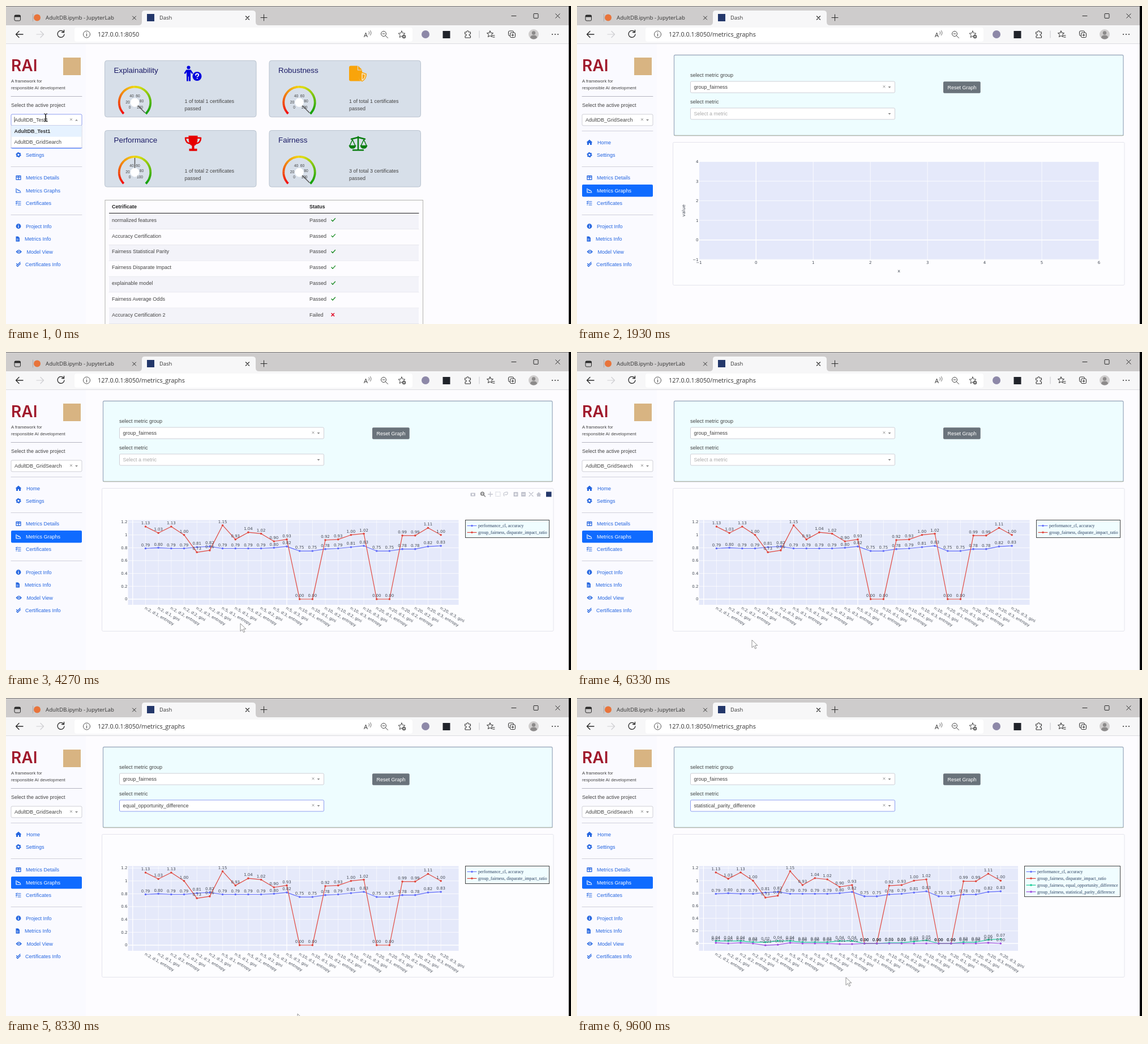
Animation of 998x561 px, one loop 9.63 s. Source, as an HTML page:

```html
<!DOCTYPE html>
<html lang="en">
<head>
<meta charset="utf-8">
<title>Dashboard demo</title>
<style>
html, body { margin: 0; width: 100%; height: 100%; overflow: hidden; background: #fdfcff; }
svg { display: block; width: 100%; height: 100%; }
text { font: 9px "Liberation Sans", Arial, sans-serif; fill: #444; white-space: pre; }
.brand { font: 600 28px Inter, sans-serif; fill: #a01a2c; }
.ui { font-family: "Open Sans", "Noto Sans", sans-serif; fill: #333; }
.plot { font: 7px "DejaVu Sans", sans-serif; fill: #444a55; }
.legend { font: 7.8px "Liberation Serif", serif; fill: #2a3f5f; }
.line { fill: none; stroke: currentColor; stroke-linecap: round; stroke-linejoin: round; }
.solid { fill: currentColor; }
</style>
</head>
<body>
<svg viewBox="0 0 998 561">
  <g id="chrome"></g>
  <g id="page"></g>
  <g id="side"></g>
  <g id="arrow"><path d="M0 0v13.5l3.3-3 2.3 5 2.2-1-2.3-4.8h4.4z" fill="#fff" stroke="#777" stroke-width=".8"/></g>
  <g id="beam"><path d="M-3-7q3 0 3 2v10q0 2-3 2M3-7q-3 0-3 2v10q0 2 3 2" fill="none" stroke="#111"/></g>
  <rect x="994" width="4" height="561"/>
</svg>
<script>
const LOOP = 9630;
const $ = id => document.getElementById(id);

// y is the vertical middle of the text
const text = (x, y, s, { size = 9, cls = '', fill, bold, anchor = 'start' } = {}) =>
  `<text x="${x}" y="${y + size * .35}" class="${cls}" text-anchor="${anchor}" style="font-size:${size}px` +
  `${fill ? `;fill:${fill}` : ''}${bold ? ';font-weight:700' : ''}">${s}</text>`;
const rect = (x, y, w, h, fill, stroke = 'none', r = 0, sw = 1) =>
  `<rect x="${x}" y="${y}" width="${w}" height="${h}" rx="${r}" fill="${fill}" stroke="${stroke}" stroke-width="${sw}"/>`;
const circle = (x, y, r, fill, extra = '') => `<circle cx="${x}" cy="${y}" r="${r}" fill="${fill}" ${extra}/>`;
const tint = color => color ? `color="${color}"` : '';
const line = (d, color, w = 1) => `<path d="${d}" class="line" ${tint(color)} stroke-width="${w}"/>`;
const solid = (d, color) => `<path d="${d}" class="solid" ${tint(color)}/>`;
const at = (x, y, body) => `<g transform="translate(${x} ${y})">${body}</g>`;
const cross = (x, y, r, color, w = 1) => line(`M${x - r} ${y - r}l${2 * r} ${2 * r}m0 ${-2 * r}l${-2 * r} ${2 * r}`, color, w);

function chrome({ title, page }) {
  const ink = '#2b2b2b';
  const url = '127.0.0.1:8050' + (page === 'graphs' ? '/metrics_graphs' : '');
  return rect(0, 0, 998, 35, '#cecccc') + rect(0, 0, 998, 1, '#7a7878') + rect(0, 34, 998, 33, '#f7f7f8') +
    solid('M234 34q6 0 6-6V13q0-5 5-5h190q6 0 6 5v15q0 6 6 6z', '#f7f7f8') +
    line('M0 66.5H994', '#dcdce0') + line('M47.5 14v13', '#aaa8a8') + rect(121, 38, 597, 25, '#fff', 'none', 4) +
    rect(15, 16, 10.5, 10, 'none', ink, 2) + rect(15, 16, 10.5, 3.5, ink, 'none', 1) +
    circle(55, 20.5, 6, '#e8743b') + text(70, 20.5, 'AdultDB.ipynb - JupyterLab', { size: 9.7, cls: 'ui' }) +
    cross(226.5, 21, 3, ink) + rect(249, 14, 13, 13, '#24386b') +
    text(271, 20.5, title, { size: 9.4, cls: 'ui' }) + cross(426.5, 21, 3, ink, 1.2) +
    line('M450 20.5h11m-5.5-5.5v11M893 17.5h8', ink) + rect(932, 13.5, 8, 8, 'none', ink, 1) + cross(974.5, 17.5, 3.7, ink) +
    line('M30 50H17.5l5.5-5.5M17.5 50l5.5 5.5', ink, 1.3) + line('M54 50h12.5l-5.5-5.5M66.5 50l-5.5 5.5', '#cfcfd2', 1.2) +
    line('M102 46a6 6 0 1 0 1 4M102.5 42.5v4h-4', ink, 1.3) +
    circle(142.5, 50, 6, 'none', 'stroke="#555"') + line('M142.5 49v4M142.5 46.5v.2', '#555', 1.2) +
    text(162, 50, url, { size: 10.8, cls: 'ui' }) +
    text(632, 51, 'A', { size: 11, cls: 'ui' }) + line('M641 45q2 2 0 5M643.5 43.5q3 4 0 8', '#555', .9) +
    circle(667, 49, 4.5, 'none', 'stroke="#444"') + line('M670.5 52.5l4 4M665 49h4', '#444') +
    line('M699 44l1.7 3.8 4.3.4-3.2 3 1 4.2-3.8-2.2-3.8 2.2 1-4.2-3.2-3 4.3-.4z', '#444') +
    circle(703, 54, 3.2, '#555') + line('M701.5 54h3m-1.5-1.5v3', '#fff', .8) +
    circle(741, 50, 7, '#8d88a8') + rect(771.5, 44, 13, 13, '#20232a') +
    line('M811 46h3q-.5-2.5 1.5-2.5t1.5 2.5h3.5v3.5q-2.5-.5-2.5 1.5t2.5 1.5v3.5h-9.5v-3.5q2.5.5 2.5-1.5t-2.5-1.5z', ink) +
    line('M836 44v12', '#c8c8cc') +
    line('M855 44l1.5 3.5 4 .3-3 2.7 1 4-3.5-2-3.5 2 1-4-3-2.7 4-.3zM859 52h4m-3 3h3', ink) +
    rect(887.5, 44, 9, 8.5, 'none', ink, 2) + rect(890.5, 47, 9, 8.5, '#f7f7f8', ink, 2) + line('M893 51.3h4m-2-2v4', ink) +
    circle(932, 50, 9, '#cfcdcd') + circle(932, 47.5, 3.2, '#8c8a8a') + solid('M926 56q0-4.5 6-4.5t6 4.5q-6 5-12 0z', '#8c8a8a') +
    [965, 970, 975].map(x => circle(x, 50, 1, ink)).join('');
}

const FOCUS = '#8e9df0';
function select(x, y, w, value, { focus, open, hint } = {}) {
  const mid = y + 10, end = x + w;
  const arrow = open ? `M${end - 12} ${mid + 1.5}h5l-2.5-2.5z` : `M${end - 12} ${mid - 1}h5l-2.5 2.7z`;
  return rect(x, y, w, 20, '#fff', focus ? FOCUS : '#cfcfd6', 2) +
    text(x + 6, mid, value || hint, { fill: value ? '#444' : '#aaa' }) +
    (value ? cross(end - 19, mid - .8, 1.6, '#888', .9) : '') + solid(arrow, '#888') +
    (open ? line(`M${x + 6} ${mid - 5}v9`, '#333', .8) : '');
}

const OPTION = 19.7;
function menu(x, y, w, options, hover, current) {
  const bottom = y + options.length * OPTION;
  return rect(x, y, w, bottom - y, '#fff', '#cfd3e0') +
    options.map((o, i) => (i === hover ? rect(x + .5, y + i * OPTION, w - 1, OPTION, '#e6f2ff') : '') +
      text(x + 5.5, y + (i + .5) * OPTION - .5, o, o === current ? { bold: true, fill: '#333' } : {})).join('') +
    line(`M${x} ${bottom}h${w}`, FOCUS, 1.2);
}

// label, middle, text start, icon
const NAV = [
  ['Home', 240.5, 36, solid('M-5.5 0L0-4.8 5.5 0H4v4.5H1V1.5H-1v3H-4V0z')],
  ['Settings', 262.5, 35, circle(0, 0, 2.7, 'none', 'stroke="currentColor" stroke-width="2"') +
    circle(0, 0, 3.9, 'none', 'stroke="currentColor" stroke-width="1.5" stroke-dasharray="2 2.08"')],
  ['Metrics Details', 303, 35, line('M-4-3.3h8v6.6h-8zM-4-.5h8M0-3v6M-4-2.8h8', '', 1.2)],
  ['Metrics Graphs', 325.5, 35, line('M-4-3.5v7h8M-2-2l2 2 1.5-.5 2 2.5', '', 1.2)],
  ['Certificates', 348, 35, line('M-1-3h5M-1 0h5M-1 3h5M-4.5-3l1 1 1.3-2M-4.5 0l1 1 1.3-2M-4 3h.5', '', 1.1)],
  ['Project Info', 388.5, 35, circle(0, 0, 4.4, 'currentColor') + line('M0-.3v2.5M0-2.3v.1', '#fff', 1.3)],
  ['Metrics Info', 411, 33, solid('M-4.5-4.5h4l2.500 2.500v6.500h-6.500z') + line('M-3 0h3M-3 2h3', '#fff', .7)],
  ['Model View', 433.5, 36.5, solid('M-4.500 0Q.7-7 5.900 0Q.7 7-4.500 0z') + circle(.7, 0, 2.2, '#fff') + circle(.7, 0, 1.2, 'currentColor')],
  ['Certificates Info', 455.5, 34, line('M-3.5-1l2 2 4.5-4.5M-3.5 2l2 2 5-5', '', 1.2)]
];
const PROJECTS = ['AdultDB_Test1', 'AdultDB_GridSearch'];

function sidebar({ project, page, open, focus, hover }) {
  const active = page === 'home' ? 'Home' : 'Metrics Graphs';
  const nav = NAV.map(([label, y, x, icon]) => {
    const on = label === active, fill = on ? '#fff' : '#2566e0';
    return (on ? rect(9, y - 10.5, 125, 21.5, '#0f6bff', 'none', 2) : '') +
      `<g color="${fill}">${at(22, y, icon)}</g>` + text(x, y, label, { fill });
  }).join('');
  return rect(0, 67, 141, 494, '#fafaff') + '<text x="9" y="114.5" class="brand">RAI</text>' +
    rect(101, 91, 31, 31, '#d8b482') +
    text(9, 132.5, 'A framework for', { size: 7.8 }) + text(9, 144.5, 'responsible AI development', { size: 7.8 }) +
    [159.5, 220.5, 283.5, 368.5].map((y, i) => line(`M9 ${y}h125`, i ? '#d0d0da' : '#b4b4c0')).join('') +
    text(9, 175, 'Select the active project') +
    select(9, 191, 125, project, { focus: focus === 'project', open: open === 'project' }) + nav +
    (open === 'project' ? menu(9, 211, 125, PROJECTS, hover, project) : '');
}

function gauge(x, y, value) {
  const point = (p, r) => {
    const a = (135 + 270 * p) * Math.PI / 180;
    return `${(x + r * Math.cos(a)).toFixed(2)} ${(y + r * Math.sin(a)).toFixed(2)}`;
  };
  let arc = '';
  for (let i = 0; i < 40; i++) {
    const p = i / 40, hue = p < .5 ? p * 110 : 55 + (p - .5) * 130, light = p < .5 ? 50 : 62 - p * 30;
    arc += `<path d="M${point(p, 27.7)}A27.7 27.7 0 0 1 ${point(p + .027, 27.7)}" fill="none" stroke="hsl(${hue} 90% ${light}%)" stroke-width="3.8"/>`;
  }
  const marks = [[-9, 8], [-12.5, -.5], [-5.5, -11.5], [5.5, -11.5], [12, -2.5], [9, 8]]
    .map(([dx, dy], i) => text(x + dx, y + dy, i * 20, { size: 6.7, anchor: 'middle' })).join('');
  return arc + line(`M${x} ${y}L${point(value, 25)}`, '#555', 1.5) + marks + circle(x, y, 7.8, '#fff');
}

const CARDS = [
  ['Explainability', 1, 1, 1, circle(7, 3, 3, '#00d') +
    solid('M3 7h8l4 6-1.8 1.5-2.7-3.5v16h-3v-8h-1v8h-3v-16l-2.5 3.5L-1 13z', '#00d') + circle(22, 18.5, 8, '#00d') +
    line('M19.5 16.5q.5-2.5 2.7-2.5t2.5 2-2.5 3M22.2 22v.2', '#fff', 1.8)],
  ['Robustness', 1, 1, 1, solid('M0 3q0-3 3-3h12v8h8v4l-7 3q0 9 5 12H3q-3 0-3-3zM16 0l7 7h-7z', '#f9a40b') +
    solid('M23 11l8 3q0 10-8 14-8-4-8-14z', '#f9a40b') + line('M23 13.5l5.5 2q0 7-5.5 10z', '#f5e6c8', 1.5)],
  ['Performance', 1, 2, .5, solid('M7 0h16v4q0 12-6 14v5h5v4H8v-4h5v-5q-6-2-6-14z', '#e60000') +
    line('M7 4H1.5q0 9 9 10M23 4h5.5q0 9-9 10', '#e60000', 2.5)],
  ['Fairness', 3, 3, 1, line('M16 2v23M7 25.5h18M4 6l12-3 12 3', '#0a7d10', 2.5) +
    line('M1 18l5-11 5 11M21 18l5-11 5 11', '#0a7d10', 1.5) +
    solid('M-.5 17h13q-1 6-6.5 6t-6.5-6zM19.5 17h13q-1 6-6.5 6t-6.5-6z', '#0a7d10')]
];
const ROWS = ['normalized features', 'Accuracy Certification', 'Fairness Statistical Parity', 'Fairness Disparate Impact',
  'explainable model', 'Fairness Average Odds', 'Accuracy Certification 2'];

function home() {
  const cards = CARDS.map(([name, passed, total, value, icon], i) => {
    const x = 174.5 + i % 2 * 290.5, y = 96.3 + (i >> 1) * 123.3;
    return rect(x, y, 267.5, 99.5, '#d7dfe9', '#b9c3cf', 4) +
      text(x + 16, y + 17.2, name, { size: 13.4, fill: '#1b1b66' }) +
      at(x + 141, y + 9.2, icon) + gauge(x + 53, y + 74, value) +
      text(x + 141, y + 71.2, `${passed} of total ${total} certificates`) + text(x + 141, y + 84.7, 'passed');
  }).join('');
  const rows = ROWS.map((name, i) => {
    const y = 366 + i * 27.85, mid = y + 11.5, ok = i < 6;
    return rect(182, y, 547, 27.85, i % 2 ? '#fdfcff' : '#f3f3f9') + line(`M182 ${y + 27.8}h547`, '#dedee6') +
      text(187, mid, name) + text(536, mid, ok ? 'Passed' : 'Failed') +
      (ok ? line(`M575 ${mid}l2 2.3 4.5-5`, '#188a22', 1.3) : cross(577.3, mid, 2.3, '#e0102a', 1.5));
  }).join('');
  const head = { bold: true, fill: '#222' };
  return cards + rect(175, 342.5, 561.5, 240, '#fdfcff', '#b2b2ae') + rows + line('M182.5 365.5H729', '#222', 1.2) +
    text(187, 353.5, 'Cetrificate', head) + text(536, 353.5, 'Status', head);
}

// values in hundredths
const SERIES = [
  ['performance_cl, accuracy', '#636efa', '79 80 79 79 81 82 79 79 79 79 80 82 75 75 78 79 81 83 75 75 78 78 82 83'],
  ['group_fairness, disparate_impact_ratio', '#e0483f', '113 103 113 100 73 76 115 93 104 102 90 93 0 0 92 93 100 102 0 0 99 99 111 100'],
  ['group_fairness, equal_opportunity_difference', '#1fce9b', '4 4 4 2 2 4 4 2 2 2 4 4 0 0 1 1 3 5 0 0 2 2 6 7'],
  ['group_fairness, statistical_parity_difference', '#a04fe0', '1 0 1 0 -3 -2 1 0 0 0 -1 -1 0 0 0 0 0 0 0 0 0 0 1 0']
].map(([name, color, v]) => ({ name, color, values: v.split(' ').map(n => n / 100) }));
const LABELS = [2, 5, 10, 20].flatMap(n => [1, 2, 3].flatMap(d => ['entropy', 'gini'].map(c => `n:${n}, d:${d}, ${c}`)));
const PLOT_BG = '#e5e9fa';
const TICKS = [0, .2, .4, .6, .8, 1, 1.2];
const LAYOUTS = [null,
  { right: 922, x0: 252, dx: 27.7, y0: 1552, unit: 1500, ticks: [.76, .78, .8, .82] },
  { right: 799.5, x0: 246.5, dx: 22.68, y0: 436, unit: 113.3, ticks: TICKS, legend: 811 },
  { right: 779, x0: 245.3, dx: 21.87, y0: 433, unit: 110.8, ticks: TICKS, legend: 790 }];

const plotText = (x, y, s, anchor, size = 7) => text(x, y, String(s).replace('-', '−'), { size, anchor, cls: 'plot' });

function emptyChart() {
  let out = rect(215.5, 274.5, 706.5, 173, PLOT_BG);
  for (let i = -1; i <= 6; i++) {
    const x = 316.3 + i * 100.95;
    out += line(`M${x} 274.5v173`, '#fff', i ? .8 : 1.5) + plotText(x, 452.5, i, 'middle');
  }
  for (let i = -1; i <= 4; i++) {
    const y = 412.7 - i * 34.55;
    out += line(`M215.5 ${y}H922`, '#fff', i ? .8 : 1.5) + plotText(214.5, y, i, 'end');
  }
  return out + plotText(568.5, 467, 'x', 'middle', 7.9) +
    `<g transform="translate(188 361) rotate(-90)">${plotText(0, 0, 'value', 'middle', 7.9)}</g>`;
}

function chart(count) {
  const { right, x0, dx, y0, unit, ticks, legend } = LAYOUTS[Math.min(count, 3)];
  const px = i => x0 + i * dx, py = v => y0 - v * unit;
  let out = rect(215.5, 296.5, right - 215.5, 149.5, PLOT_BG);
  for (let i = -1; i < 24; i++) out += line(`M${px(i)} 297v149`, '#fff', i === -1 || i === 11 ? 1.3 : .6);
  for (const v of ticks) out += line(`M216 ${py(v)}H${right}`, '#fff', v ? .8 : 1.5) + plotText(214.5, py(v), v, 'end');
  LABELS.forEach((s, i) => out += `<text class="plot" transform="translate(${px(i) - 2} 453) rotate(30)">${s}</text>`);
  const shown = SERIES.slice(0, count);
  for (const { color, values } of shown) {
    out += line('M' + values.map((v, i) => `${px(i)} ${py(v)}`).join('L'), color, 1.2);
    values.forEach((v, i) => out += circle(px(i), py(v), 1.8, color));
  }
  for (const { values } of shown) values.forEach((v, i) => out += plotText(px(i), py(v) - 6.3, v.toFixed(2), 'middle'));
  if (legend) {
    out += rect(legend + .5, 296.5, 959 - legend, Math.round(7 + count * 11.8), '#f0fdff', '#444');
    shown.forEach(({ name, color }, i) => {
      const y = 306.5 + i * 11.8;
      out += line(`M${legend + 4} ${y}h16`, color, 1.2) + circle(legend + 12, y, 1.8, color) +
        text(legend + 23, y, name, { size: 7.8, cls: 'legend' });
    });
  }
  return out;
}

function modebar() {
  const c = '#c3c5cf';
  return rect(820.5, 248.5, 8.5, 6, c, 'none', 1) + circle(824.7, 251.5, 1.7, '#fff') +
    circle(841.5, 250, 2.8, 'none', 'stroke="#777" stroke-width="1.5"') + line('M844 252.5l2.5 2.5M840 250h3', '#777', 1.2) +
    line('M851.5 251h8m-4-4v8', c, 1.3) + `<rect x="865" y="247" width="8" height="7.5" fill="none" stroke="${c}" stroke-dasharray="1.5 1"/>` +
    line('M880 254q-3-5 2-6.5t4 2-5 2', c, 1.2) +
    [900.5, 914].map((x, i) => rect(x - 4, 247, 8, 8, c, 'none', 1) + line(`M${x - 2} 251h4` + (i ? '' : 'm-2-2v4'), '#fff', 1.2)).join('') +
    cross(927.5, 251, 3.5, c, 1.3) + solid('M936.5 251.5l4.5-4.5 4.5 4.5h-1.5v3.5h-6v-3.5z', c) + rect(954, 246.5, 9.5, 9, '#24386b');
}

const GROUPS = ['performance_cl', 'group_fairness'];
const METRICS = {
  performance_cl: ['accuracy'],
  group_fairness: ['disparate_impact_ratio', 'equal_opportunity_difference', 'statistical_parity_difference']
};

function graphs({ group, metric, open, focus, hover, traces, inChart }) {
  return rect(171.5, 86.5, 793.5, 142, '#eefdff', '#9fadc0', 2, 1.3) + line('M172 228.5H965', '#b3b9a8', 1.2) +
    text(200, 121.5, 'select metric group') + text(200, 168.5, 'select metric') +
    select(200.5, 133, 361, group, { focus: focus === 'group', open: open === 'group' }) +
    select(200.5, 180, 361, metric, { focus: focus === 'metric', open: open === 'metric', hint: 'Select a metric' }) +
    rect(647, 133.3, 65.7, 20.5, '#6a737b', 'none', 2) + text(654.5, 143.5, 'Reset Graph', { fill: '#fff' }) +
    rect(169.5, 240.5, 797.5, 252, '#fdfdff', '#e4e4ec', 2) +
    (traces ? chart(traces) : emptyChart()) + (inChart ? modebar() : '') +
    (open === 'group' ? menu(200.5, 153, 361, GROUPS, hover, group) : '') +
    (open === 'metric' ? menu(200.5, 200, 361, METRICS[group], hover, metric) : '');
}

const EVENTS = [
  [0, { page: 'home', title: 'Dash', project: PROJECTS[0], open: 'project', focus: 'project', group: 'group_fairness', metric: '', traces: 0 }],
  [400, { project: PROJECTS[1], open: '' }],
  [560, { title: 'Updating...' }],
  [1180, { page: 'graphs', focus: '' }],
  [1380, { title: 'Dash' }],
  [2060, { open: 'group', focus: 'group' }],
  [2250, { open: '', group: 'performance_cl' }],
  [2430, { open: 'metric', focus: 'metric' }],
  [2620, { open: '', metric: 'accuracy' }],
  [2760, { traces: 1 }],
  [2930, { open: 'group', focus: 'group' }],
  [3130, { open: '', group: 'group_fairness', metric: '' }],
  [3290, { open: 'metric', focus: 'metric' }],
  [3480, { open: '', metric: 'disparate_impact_ratio' }],
  [3640, { traces: 2 }],
  [3900, { metric: '', focus: '' }],
  [7250, { open: 'metric', focus: 'metric' }],
  [7780, { open: '', metric: 'equal_opportunity_difference' }],
  [8380, { title: 'Updating...' }],
  [8500, { title: 'Dash', traces: 3 }],
  [9060, { open: 'metric' }],
  [9260, { open: '', metric: 'statistical_parity_difference' }],
  [9420, { traces: 4 }]
];
// time, x, y of the pointer
const PATH = [[0, 70, 197], [120, 70, 197], [330, 62, 240], [450, 62, 240], [860, 149, 361], [930, 149, 361], [1130, 70, 326], [1230, 70, 326],
  [1700, 380, 143], [2130, 380, 143], [2220, 360, 163], [2400, 380, 190], [2600, 360, 210], [2900, 380, 143], [3100, 360, 182],
  [3260, 380, 190], [3450, 360, 210], [3650, 360, 210], [4150, 414, 479], [4900, 414, 479], [5400, 420, 538], [5900, 309, 508],
  [6600, 309, 508], [7150, 380, 190], [7400, 380, 190], [7680, 360, 230], [7820, 360, 230], [8250, 515, 557], [8750, 515, 557],
  [9030, 380, 190], [9220, 360, 249], [9300, 360, 249], [9540, 475, 493], [LOOP, 475, 493]];

function pointer(t) {
  const i = PATH.findIndex(p => p[0] > t), [ta, xa, ya] = PATH[i - 1], [tb, xb, yb] = PATH[i];
  const k = (t - ta) / (tb - ta), e = k * k * (3 - 2 * k);
  return [xa + (xb - xa) * e, ya + (yb - ya) * e];
}

const MENU_TOP = { project: 211, group: 153, metric: 200 };
let drawn = '';
function frame() {
  const t = performance.now() % LOOP, [x, y] = pointer(t);
  const s = Object.assign({}, ...EVENTS.filter(e => e[0] <= t).map(e => e[1]));
  if (s.open) s.hover = Math.max(0, Math.floor((y - MENU_TOP[s.open]) / OPTION));
  s.inChart = s.page === 'graphs' && x > 169 && x < 967 && y > 240 && y < 492;
  const key = JSON.stringify(s);
  if (key !== drawn) {
    drawn = key;
    $('chrome').innerHTML = chrome(s);
    $('page').innerHTML = s.page === 'home' ? home() : graphs(s);
    $('side').innerHTML = sidebar(s);
  }
  const beam = t < 200, hidden = t > 1720 && t < 2000;
  $('beam').style.display = beam ? '' : 'none';
  $('arrow').style.display = beam || hidden ? 'none' : '';
  for (const id of ['beam', 'arrow']) $(id).setAttribute('transform', `translate(${x} ${y})`);
  requestAnimationFrame(frame);
}
frame();
</script>
</body>
</html>
```
